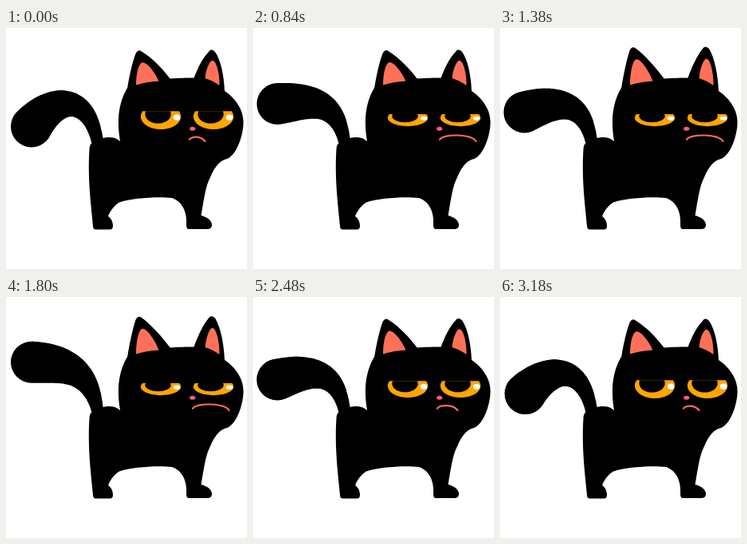
Animation of 302x302 px, one loop 3.2 s. Source, as an HTML page:

```html
<!DOCTYPE html>
<html lang="en">
<head>
<meta charset="utf-8">
<title>Grumpy cat</title>
<style>
  html, body { margin: 0; width: 100%; height: 100%; overflow: hidden; background: #fff; }
  svg { display: block; width: 100vw; height: 100vh; }
</style>
</head>
<body>
<svg viewBox="0 0 302 302">
  <defs>
    <clipPath id="lid"><rect x="-30" y="-11.1" width="60" height="40"/></clipPath>
    <g id="eye" clip-path="url(#lid)">
      <ellipse cy="-4.4" rx="25.2" ry="16" fill="#ffa500"/>
      <ellipse cx="-3.5" cy="-7.4" rx="16.2" ry="11.6"/>
      <ellipse cx="20" cy="-3.2" rx="4.2" ry="3.6" fill="#fff"/>
    </g>
  </defs>
  <path id="tail"/>
  <path d="M143 142C139 118 140 95 152 75C165 65 190 64 205 63.5C215 62.5 228 62.5 236 62.5L274 79
    C286 87 297.5 101 297.5 118C297.5 136 288 160 277 164C270 165 262 172 256 187C250 198 248 215 244.5 235
    C252 237 258 241 258 247Q258 252 252 252L229 252Q226 252 226 247C227 232 222 218 208 213
    C190 211 158 213 142 218.5C136 222 130 230 128 236C131 238 134 242 134 248Q134 252.5 130 252.5
    L112 252.5Q109 252 109 248C107 225 102 190 104.5 152Q105 144 109 144
    C112 142 118 138 124 137.5C132 136 139 138 143 142Z"/>
  <path id="ears"/>
  <path id="inner" fill="#ff7059"/>
  <g id="eyes">
    <use href="#eye" x="194"/>
    <use href="#eye" x="260"/>
  </g>
  <ellipse cx="233.7" cy="126.2" rx="3.6" ry="2.5" fill="#ff5a7e"/>
  <path id="mouth" fill="none" stroke="#f96a5a" stroke-width="2.2" stroke-linecap="round"/>
</svg>
<script>
const LOOP = 3200, WAG = LOOP / 3, RISE = 733, TWITCH = LOOP / 4;
const $ = id => document.getElementById(id);
const mix = (a, b, k) => a + (b - a) * k;
const ramp = (t, from, to) => {
  const u = Math.min(1, Math.max(0, (t - from) / (to - from)));
  return u * u * (3 - 2 * u);
};
const bezier = (a, b, c, d, t) => {
  const u = 1 - t;
  return u * u * u * a + 3 * u * u * t * b + 3 * u * t * t * c + t * t * t * d;
};
const disc = (x, y, r) => `M${x - r} ${y}a${r} ${r} 0 1 0 ${2 * r} 0a${r} ${r} 0 1 0 ${-2 * r} 0`;

// Discs growing along a bent spine; swing 0 is low, 1 is high
function tailPath(swing) {
  const sag = 4 * swing * (1 - swing), steps = 70;
  const bendY = mix(82, 83, swing) + 10.5 * sag;
  const tipX = 32 - 1.5 * sag, tipY = mix(123.5, 81.5, swing);
  let d = "";
  for (let i = 0; i <= steps; i++) {
    const t = i / steps;
    const growth = mix(t ** 1.25, Math.sin(t * Math.PI / 2) ** 1.3, swing);
    d += disc(bezier(115, 105, 63, tipX, t), bezier(145, 84, bendY, tipY, t), 7.5 + 18.5 * growth);
  }
  return d;
}

function earPath(d) {
  return `M152 76C155 57 159 ${41 - d / 2} 162.5 ${32 - d}Q165.5 ${26 - d} 170 ${29.5 - d}` +
    `C183 ${37 - d / 2} 197 52 206 64L206 80L152 90Z` +
    `M235 64C241 ${48 - d / 4} 247 ${37 - d / 2} 253.5 ${30.5 - d}Q257 ${24.5 - d} 262 ${30 - d}` +
    `C269 ${40 - d / 2} 273 58 274 80L235 80Z`;
}

function innerPath(d) {
  const l = 43 - d, r = 40.5 - d * 0.6;
  return `M163 71.5C163 60 165 ${l + 4} 170 ${l + 0.5}C175 ${l - 2} 186 ${54 - d / 2} 191.5 66.5C181 67 171 69 163 71.5Z` +
    `M249.5 63C250 54 254 ${r + 3} 257.5 ${r + 0.5}C263 ${r - 2} 268 56 267.5 72C262 68 256 65 249.5 63Z`;
}

function mouthPath(k) {
  const x = mix(229.8, 234, k), end = mix(249.5, 279.5, k), y = mix(135.3, 132.4, k);
  return `M${x} 139.8C${x + 4} ${y} ${end - 5.5} ${y} ${end} 142`;
}

function draw(t) {
  const w = t % WAG;
  $("tail").setAttribute("d", tailPath(w < RISE ? w / RISE : (WAG - w) / (WAG - RISE)));

  const lift = 3.4 * (1 - Math.cos(2 * Math.PI * t / TWITCH));
  $("ears").setAttribute("d", earPath(lift));
  $("inner").setAttribute("d", innerPath(lift));

  const frown = ramp(t, 200, 800) - ramp(t, 2040, 2680);
  $("eyes").setAttribute("transform", `translate(0 115.4) scale(1 ${mix(1, 0.668, frown)})`);
  $("mouth").setAttribute("d", mouthPath(frown));
}

const start = performance.now();
function tick() {
  draw((performance.now() - start) % LOOP);
  requestAnimationFrame(tick);
}
tick();
</script>
</body>
</html>
```
